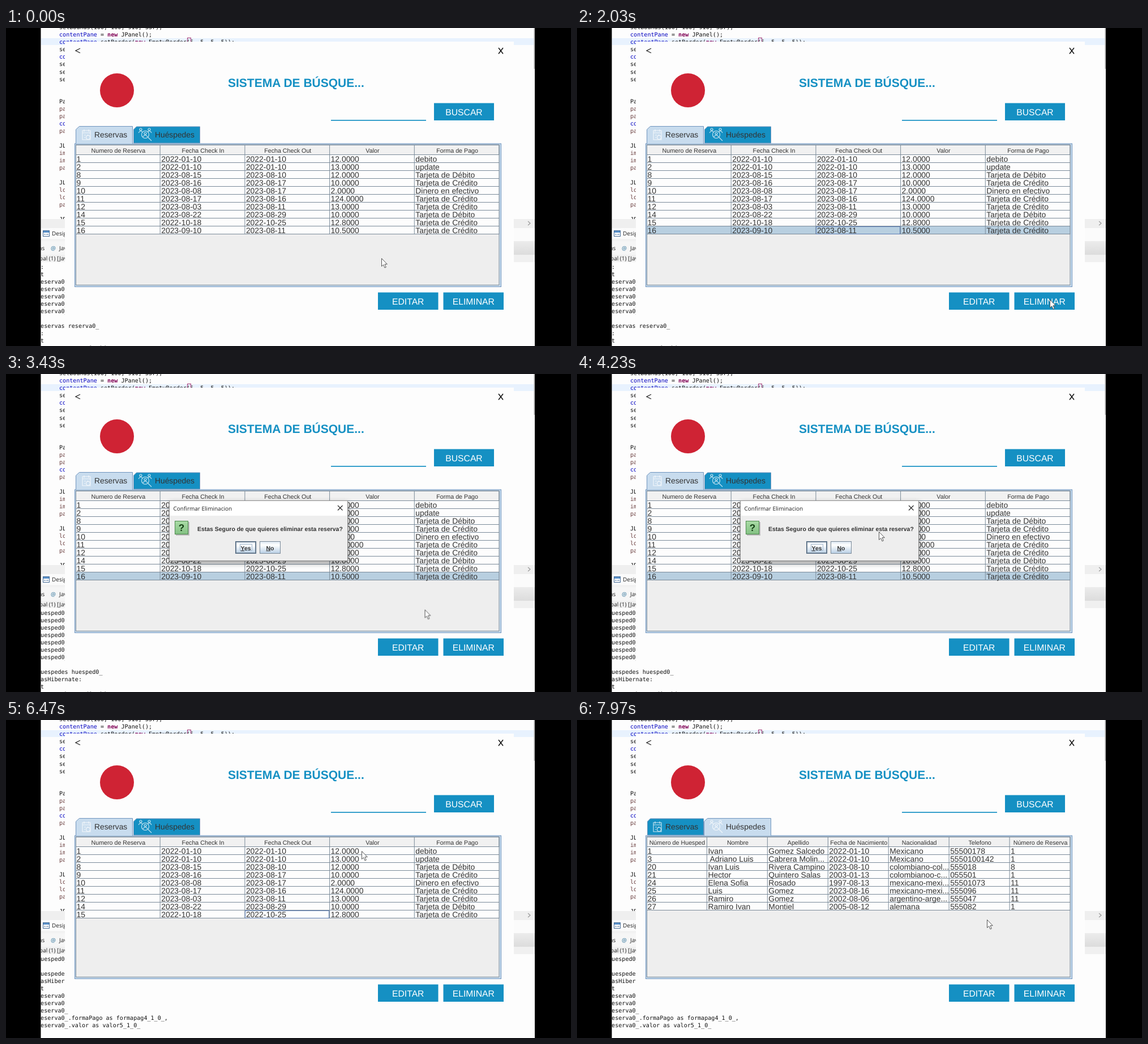
An HTML page that plays this animation: 998x561 px, repeating every 8 s.

```html
<!DOCTYPE html>
<html lang="es">
<head>
<meta charset="utf-8">
<title>Sistema de búsqueda</title>
<style>
  html, body { margin: 0; width: 100%; height: 100%; overflow: hidden; background: #000; }
  svg { display: block; width: 998px; height: 561px; }
  text { white-space: pre; font-family: "Liberation Sans", Arial, sans-serif; fill: #333; text-rendering: geometricPrecision; }
  .code { font: 10.1px "DejaVu Sans Mono", monospace; fill: #111; }
  .ide { font: 10px "Open Sans", sans-serif; fill: #222; }
  .cell { font-size: 13.9px; }
  .head { font-size: 10.7px; text-anchor: middle; }
  .tab { font-size: 13.8px; }
  .button { font-size: 15.7px; fill: #fff; text-anchor: middle; }
  .bold { font-size: 10.46px; font-weight: bold; }
  .icon { fill: none; stroke: #fff; stroke-width: 1.1; opacity: .8; }
  #cursor { animation: move 8s ease-in-out infinite; }
  #dialog { transform-origin: 446px 276px; animation: dialog 8s linear infinite; }
  @keyframes move {
    0% { transform: translate(663px, 406px); }
    4%, 5.8% { transform: translate(520px, 353px); }
    13.75% { transform: translate(806px, 507px); }
    20%, 36.5% { transform: translate(835px, 479px); }
    52.875% { transform: translate(533px, 278px); }
    61%, 68.5% { transform: translate(430px, 303px); }
    80.875% { transform: translate(628px, 231px); }
    87%, 89% { transform: translate(283px, 187px); }
    99.6%, 100% { transform: translate(724px, 352px); }
  }
  @keyframes dialog {
    0%, 33% { opacity: 0; transform: scale(.95); }
    34.9%, 68.6% { opacity: 1; transform: none; }
    70%, 100% { opacity: 0; transform: scale(.95); }
  }
</style>
</head>
<body>
<script>
const LOOP = 8000, SELECT = 400, ASK = 2600, DELETED = 5600, SWITCH = 7050;
const BLUE = '#1590c3', PALE = '#c8dcee', GRID = '#7a8a99', EDGE = '#6f94bd';
let rules = '', count = 0;

const rect = (x, y, w, h, fill, stroke) =>
  `<rect x="${x}" y="${y}" width="${w}" height="${h}" fill="${fill}"${stroke ? ` stroke="${stroke}"` : ''}/>`;
const text = (x, y, kind, content) => `<text x="${x}" y="${y}" class="${kind}">${content}</text>`;
const path = (d, stroke, width = 1, fill = 'none') =>
  `<path d="${d}" stroke="${stroke}" stroke-width="${width}" fill="${fill}"/>`;
const tint = (color, s) => `<tspan fill="${color}">${s}</tspan>`;

// Shows the content only between two times of the loop.
function during(from, to, content) {
  const name = 'show' + count++, pct = t => t / LOOP * 100 + '%';
  const first = from ? '0% { visibility: hidden }' : '';
  const last = to < LOOP ? `${pct(to)}, 100% { visibility: hidden }` : '100% { visibility: visible }';
  rules += `@keyframes ${name} { ${first} ${pct(from)} { visibility: visible } ${last} }
    .${name} { animation: ${name} ${LOOP}ms step-end infinite }`;
  return `<g class="${name}">${content}</g>`;
}

function editor() {
  const field = s => tint('#0000c0', s), word = `<tspan fill="#7f0055" font-weight="bold">new</tspan>`;
  const local = '#6a3e3e';
  const stubs = '||se|co|se|se|se|||Pa|pa|pa|co|pa||JL|im|im|pa||JL|lo|lo|pa||JP'.split('|');
  let out = rect(62, 18, 872, 12, '#e8f2fe') +
    text(94, 2, 'code', 'setBounds(100, 100, 910, 537);') +
    text(94, 15, 'code', `${field('contentPane')} = ${word} JPanel();`) +
    text(94, 28, 'code', `${field('contentPane')}.setBorder(${word} EmptyBorder(5, 5, 5, 5));`) +
    rect(320.5, 17.5, 6, 11, 'none', '#a03070');
  stubs.forEach((s, i) => {
    const color = s == 'co' ? '#0000c0' : /pa|im|lo/.test(s) ? local : '#111';
    out += text(94, 15.3 + 13.04 * i, 'code', tint(color, s));
  });
  return out +
    rect(62, 337, 872, 16, '#efefef') + path('M922 341l4 3.500-4 3.500', '#999', 1.2) +
    rect(932, 0, 2, 72, '#c8c8c8') +
    rect(62, 353, 872, 23, '#fbfbfb') + rect(62, 372, 42, 4, '#f2f2f2') +
    rect(65.5, 357.5, 11, 10, '#fff', '#456b96') + rect(66, 358, 10, 3, '#5b91c9') +
    path('M67 364h3m1 0h4', '#456b96') + text(81, 366, 'ide', 'Design') +
    rect(897, 376, 37, 24, 'url(#band)') + rect(62, 376, 42, 24, '#f6f6f6') +
    rect(62, 400, 872, 13, '#f0f0f0') +
    text(58, 392, 'ide', 'as') + text(79, 392, 'ide', tint('#2a7098', '@')) + text(94, 392, 'ide', 'Java') +
    text(59, 410, 'ide', 'bal (1) [Java');
}

const consoleLines = lines => lines.map((s, i) => text(55, 425 + 13 * i, 'code', s)).join('');
function consoles() {
  const r = 'reserva0_', h = 'huesped0_';
  return during(0, ASK, consoleLines([' :', 'st', r, r, r, r, r, '', 'Reservas reserva0_', ' :', 'st', '        reserva0_.id'])) +
    during(ASK, DELETED, consoleLines([h, h, h, h, h, h, h, '', 'Huespedes huesped0_', 'casHibernate:', 'st', '        huesped0_.id'])) +
    during(DELETED, LOOP, consoleLines([h, '', 'Huespedes', 'casHibernate:', 'st', r, r, r,
      'reserva0_.formaPago as formapag4_1_0_,', 'reserva0_.valor as valor5_1_0_', '', '   reservas']));
}

function button(x, y, w, label) {
  return rect(x, y, w, 30.5, BLUE) + text(x + w / 2, y + 21, 'button', label);
}

function frame() {
  return rect(104, 24, 793, 493, '#fdfdfd') +
    path('M131 36l-8 4 8 4', '#222', 1.3) +
    path('M870 35l8 10.500M878 35l-8 10.500', '#111', 1.5) +
    '<circle cx="196" cy="110" r="30" fill="#cf2334"/>' +
    `<text x="392" y="104" font-size="21" font-weight="bold" style="fill:${BLUE}">SISTEMA DE BÚSQUE...</text>` +
    rect(574, 162, 168, 1.7, BLUE) +
    button(756, 132.5, 106, 'BUSCAR') + button(657, 466.5, 106.5, 'EDITAR') + button(772.5, 466.5, 106.5, 'ELIMINAR') +
    rect(121.5, 204, 753, 252.5, PALE, EDGE) + rect(123.5, 206, 747.5, 247.5, '#eee', GRID);
}

function tabs(guests) {
  const shape = (x, r, on) => on
    ? path(`M${x} 204V179l6-5.500H${r}V204`, EDGE, 1, PALE)
    : path(`M${x + 1} 203V179l5-5H${r}V203Z`, EDGE, 1, BLUE);
  return shape(123.5, 223.5, !guests) + shape(224.5, 342.5, guests) +
    text(156, 193, 'tab', 'Reservas') + text(263, 193, 'tab', 'Huéspedes') +
    `<g class="icon"><path d="M135 181h14v16h-14zM135 185h14M138 179v4m8-4v4M138 189h3m2 0h3M138 193h2"/>
      <circle cx="145" cy="193" r="3.5"/><circle cx="246" cy="188" r="6.500"/><path d="M251 193l6 6M242 192q4-6 8 0"/>
      <circle cx="246" cy="186" r="2"/><circle cx="238" cy="179" r="2"/><circle cx="253" cy="179" r="2"/>
      <path d="M234 185q4-6 7-1M250 184q4-5 7 1"/></g>`;
}

const columns = n => Array.from({ length: n + 1 }, (_, i) => 122.5 + i * 748.5 / n);
function row(cells, i) {
  const y = 224 + 14 * i, xs = columns(cells.length);
  return path(`M123 ${y + 13.5}H871` + xs.slice(1).map(x => `M${x} ${y}v14`).join(''), GRID) +
    cells.map((s, c) => text(xs[c] + 2, y + 12, 'cell', s)).join('');
}
function header(names) {
  const xs = columns(names.length), w = xs[1] - xs[0];
  return rect(123.5, 206.5, 747.5, 17, '#f1f1f1', GRID) + names.map((s, c) =>
    text(xs[c] + w / 2 + 1, 219.5, 'head', s) + path(`M${xs[c + 1]} 206v18`, GRID)).join('');
}
const parse = s => s.trim().split('\n').map(line => line.trim().split('|'));
const paper = (i, n, fill = '#fdfdfd') => rect(124, 224 + 14 * i, 747, 14 * n, fill);
const focus = i => rect(422.5, 224.5 + 14 * i, 148, 13, 'none', '#5f7fb5');

function bookings() {
  const rows = parse(`
    1|2022-01-10|2022-01-10|12.0000|debito
    2|2022-01-10|2022-01-10|13.0000|update
    8|2023-08-15|2023-08-10|12.0000|Tarjeta de Débito
    9|2023-08-16|2023-08-17|10.0000|Tarjeta de Crédito
    10|2023-08-08|2023-08-17|2.0000|Dinero en efectivo
    11|2023-08-17|2023-08-16|124.0000|Tarjeta de Crédito
    12|2023-08-03|2023-08-11|13.0000|Tarjeta de Crédito
    14|2023-08-22|2023-08-29|10.0000|Tarjeta de Débito
    15|2022-10-18|2022-10-25|12.8000|Tarjeta de Crédito`);
  return tabs(false) + header(['Numero de Reserva', 'Fecha Check In', 'Fecha Check Out', 'Valor', 'Forma de Pago']) +
    paper(0, rows.length) + rows.map(row).join('');
}
function lastBooking() {
  return during(0, DELETED, paper(9, 1)) + during(SELECT, DELETED, paper(9, 1, '#b8cfe0')) +
    during(0, DELETED, row(['16', '2023-09-10', '2023-08-11', '10.5000', 'Tarjeta de Crédito'], 9)) +
    during(SELECT, ASK, focus(9)) + during(DELETED, SWITCH, focus(8));
}

function guests() {
  const rows = parse(`
    1|Ivan|Gomez Salcedo|2022-01-10|Mexicano|55500178|1
    3| Adriano Luis|Cabrera Molin...|2022-01-10|Mexicano|5550100142|1
    20|Ivan Luis|Rivera Campino|2023-08-10|colombiano-col...|555018|8
    21|Hector|Quintero Salas|2003-01-13|colombianoo-c...|055501|1
    24|Elena Sofia|Rosado|1997-08-13|mexicano-mexi...|55501073|11
    25|Luis|Gomez|2023-08-16|mexicano-mexi...|555096|11
    26|Ramiro|Gomez|2002-08-06|argentino-arge...|555047|11
    27|Ramiro Ivan|Montiel|2005-08-12|alemana|555082|1`);
  return tabs(true) + header(['Número de Huesped', 'Nombre', 'Apellido', 'Fecha de Nacimiento', 'Nacionalidad', 'Telefono', 'Número de Reserva']) +
    paper(0, rows.length) + rows.map(row).join('');
}

function dialog() {
  const choice = (x, main, label) =>
    rect(x + .5, 295.5, 36, 21, 'url(#metal)', main ? '#4f6781' : GRID) +
    (main ? rect(x + 1.5, 296.5, 34, 19, 'none', GRID) + rect(x + 8.5, 300.5, 21, 11, 'none', '#a3b8cc') : '') +
    `<text x="${x + 18.5}" y="310.5" class="bold" text-anchor="middle"><tspan text-decoration="underline">${label[0]}</tspan>${label.slice(1)}</text>`;
  return `<g id="dialog"><g filter="url(#shadow)">${rect(288, 223, 316, 107, '#8c8c8c')}</g>` +
    rect(289, 224, 314, 26, '#fff') + rect(289, 250, 314, 79, '#eee') +
    text(295.5, 240.5, 'ide', 'Confirmar Eliminacion') +
    path('M586 232l8.500 8.500M594.500 232l-8.500 8.500', '#222', 1.1) +
    rect(300, 261, 24, 24, '#bbb') + rect(298.5, 259.5, 23, 23, 'url(#green)', '#4d8a4d') +
    '<text x="310" y="276.5" font-size="17" font-weight="bold" text-anchor="middle" style="fill:#123c12">?</text>' +
    text(338, 277, 'bold', 'Estas Seguro de que quieres eliminar esta reserva?') +
    choice(405, true, 'Yes') + choice(448, false, 'No') + '</g>';
}

const defs = `<defs>
  <linearGradient id="metal" x2="0" y2="1"><stop stop-color="#dde8f3"/><stop offset=".3" stop-color="#fff"/><stop offset="1" stop-color="#b8cfe5"/></linearGradient>
  <linearGradient id="green" x2="0" y2="1"><stop stop-color="#a9dba5"/><stop offset="1" stop-color="#83c183"/></linearGradient>
  <linearGradient id="band" x2="0" y2="1"><stop stop-color="#ececec"/><stop offset="1" stop-color="#dcdcdc"/></linearGradient>
  <filter id="shadow" x="-10%" y="-20%" width="120%" height="150%"><feDropShadow dx="1" dy="4" stdDeviation="5" flood-opacity=".4"/></filter>
  <clipPath id="screen"><rect x="61.5" width="872.5" height="561"/></clipPath></defs>`;
const cursor = `<g id="cursor">${path('M.5.500V14.500L3.700 11.600 6 17 8.300 16 6 10.700H10.300Z', '#555', 1, '#fff')}</g>`;

const scene = defs + '<g clip-path="url(#screen)">' + rect(61, 0, 874, 561, '#fdfdfd') +
  editor() + consoles() + frame() +
  during(0, SWITCH, bookings()) + lastBooking() + during(SWITCH, LOOP, guests()) +
  dialog() + cursor + '</g>';
document.head.insertAdjacentHTML('beforeend', `<style>${rules}</style>`);
document.body.innerHTML = `<svg viewBox="0 0 998 561">${scene}</svg>`;
</script>
</body>
</html>
```
